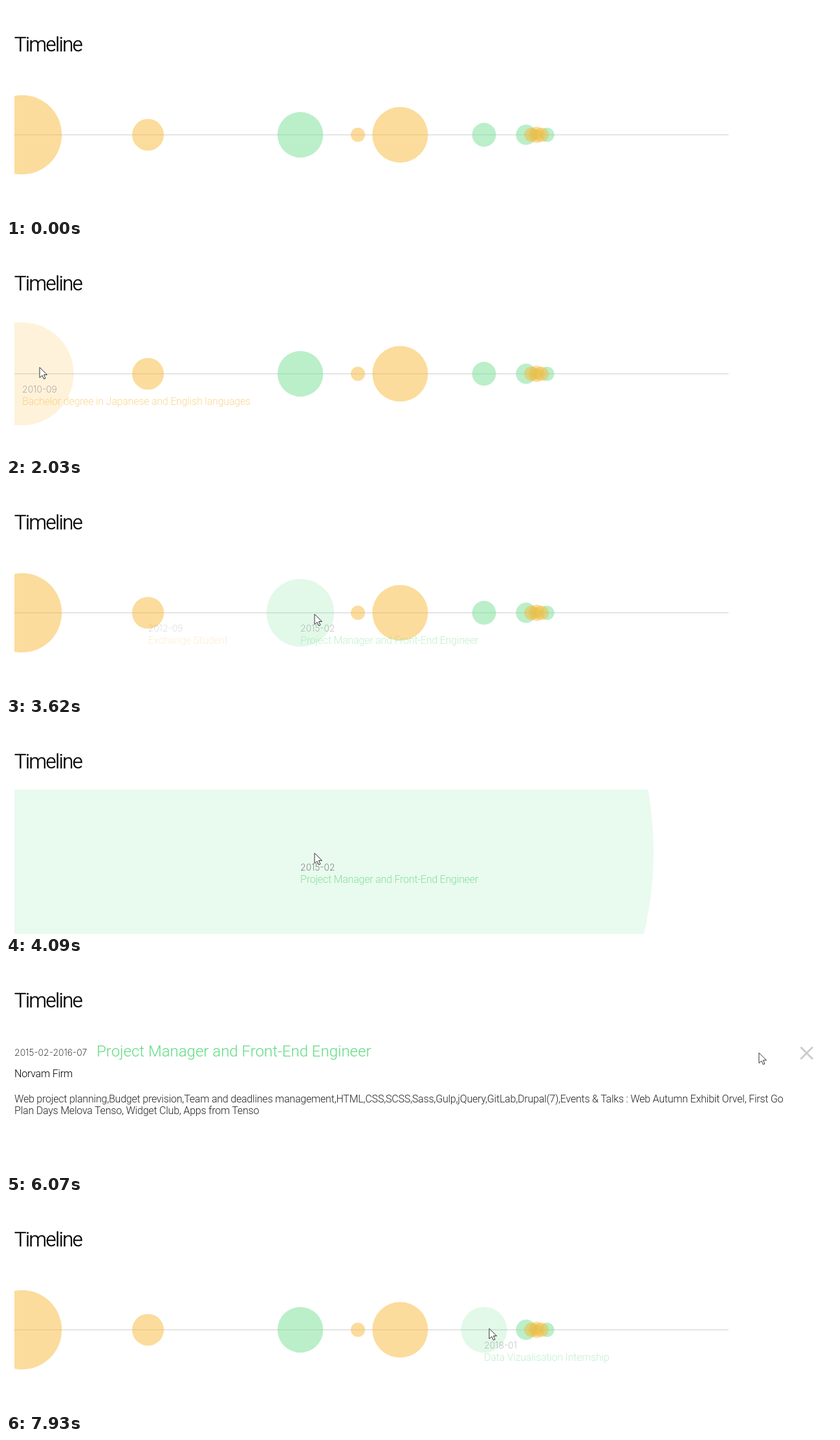
These frames come from a looping animation (1280 px wide and 326 px high, 8000 ms). An HTML page:

```html
<!DOCTYPE html>
<html lang="en">
<head>
<meta charset="utf-8">
<title>Timeline</title>
<style>
  html, body { margin: 0; width: 100%; height: 100%; overflow: hidden; background: #fff; }
  svg { display: block; width: 1280px; height: 326px; }
  text { font: 300 16px Roboto, sans-serif; letter-spacing: -.21px; }
  .heading { font-size: 31px; letter-spacing: -1.45px; stroke: #000; stroke-width: .4px; }
  .date { font: 200 14px Inter, sans-serif; letter-spacing: 0; }
  .role { font-size: 24px; letter-spacing: 0; fill: #5fdc82; }
  .body { fill: #222; }
</style>
</head>
<body>
<svg viewBox="0 0 1280 326">
  <clipPath id="frame"><rect x="13" y="103" width="1255" height="223"/></clipPath>
  <text class="heading" x="13" y="70">Timeline</text>
  <g id="chart" clip-path="url(#frame)">
    <path id="axis" d="M13 199H1117" stroke="#ddd" stroke-width="1.5"/>
    <g id="bubbles"></g>
    <g id="labels"></g>
  </g>
  <g id="detail">
    <text class="date" x="13" y="145">2015-02-2016-07</text>
    <text class="role" x="140" y="146">Project Manager and Front-End Engineer</text>
    <text x="13" y="178">Norvam Firm</text>
    <text class="body" x="13" y="217">Web project planning,Budget prevision,Team and deadlines management,HTML,CSS,SCSS,Sass,Gulp,jQuery,GitLab,Drupal(7),Events &amp; Talks : Web Autumn Exhibit Orvel, First Go</text>
    <text class="body" x="13" y="235">Plan Days Melova Tenso, Widget Club, Apps from Tenso</text>
    <path d="M1228.5 131.5l18.5 18.5m0-18.5l-18.5 18.5" stroke="#ccc" stroke-width="3"/>
  </g>
  <path id="cursor" d="M0 0V16L4 12.5L6.5 18L9 17L6.5 11.5H11.5Z" fill="#fff" stroke="#333"/>
</svg>
<script>
const LOOP = 8000, GROW = 700, FADE = 1400, OPEN = 3816, CLOSE = 6300;
const ORANGE = '#f7b93b', GREEN = '#77df93';
const $ = id => document.getElementById(id);

// x, radius, colour and, where hovered: enter, leave, date, title
const items = [
  [25, 61.2, ORANGE, 1570, 2180, '2010-09', 'Bachelor degree in Japanese and English languages'],
  [219.5, 24.5, ORANGE, 2450, 2990, '2012-09', 'Exchange Student'],
  [455, 35.3, GREEN, 3240, 4500, '2015-02', 'Project Manager and Front-End Engineer'],
  [544, 11, ORANGE],
  [609.3, 43, ORANGE],
  [739, 18.5, GREEN, 7550, 9999, '2018-01', 'Data Vizualisation Internship'],
  [804, 15.7, GREEN],
  [820, 9, GREEN],
  [836.5, 11, GREEN],
  [812, 11, ORANGE],
  [820.3, 12.5, ORANGE],
  [828, 11, ORANGE]
].map(([x, r, fill, enter, leave, date, title]) => {
  const circle = add('circle', $('bubbles'), { cx: x, cy: 199, fill });
  const label = title && add('g', $('labels'));
  if (label) {
    add('text', label, { x, y: 228, class: 'date', fill: '#444' }).textContent = date;
    add('text', label, { x, y: 247, fill }).textContent = title;
  }
  return { r, enter, leave, circle, label };
});
const opened = items[2];

// Cursor stops: time, x, y
const stops = [
  [1130, 744, 276], [1590, 66, 190], [1750, 52, 189], [2080, 52, 189], [2180, 108, 191],
  [2450, 215, 195], [2900, 225, 198], [3250, 477, 201], [5180, 477, 201], [5250, 759, 158],
  [5650, 759, 158], [6150, 1240, 137], [6380, 1240, 137], [6760, 865, 186], [7240, 828, 183],
  [7320, 828, 183], [7390, 726, 198], [7590, 726, 198], [7680, 747, 197], [LOOP, 747, 197]
];

function add(tag, parent, attrs = {}) {
  const el = document.createElementNS('http://www.w3.org/2000/svg', tag);
  for (const key in attrs) el.setAttribute(key, attrs[key]);
  return parent.appendChild(el);
}

const ramp = (t, from, to) => Math.min(1, Math.max(0, (t - from) / (to - from)));

// The CSS "ease" curve, solved by bisection
function ease(t, start, duration) {
  const p = ramp(t, start, start + duration);
  if (p === 0 || p === 1) return p;
  const bezier = (s, a, b) => 3 * s * (1 - s) ** 2 * a + 3 * s * s * (1 - s) * b + s ** 3;
  let low = 0, high = 1;
  for (let i = 0; i < 16; i++) {
    const mid = (low + high) / 2;
    if (bezier(mid, .25, .25) < p) low = mid; else high = mid;
  }
  return bezier(low, .1, 1);
}

function hover(item, t, duration) {
  if (!item.label || (item === opened && t > item.leave)) return 0;
  return ease(t, item.enter, duration) - ease(t, item.leave, duration);
}

function moveCursor(t) {
  const next = stops.findIndex(stop => stop[0] > t);
  $('cursor').style.opacity = next > 0 ? 1 : 0;
  if (next < 1) return;
  const [t0, x0, y0] = stops[next - 1], [t1, x1, y1] = stops[next];
  const p = ramp(t, t0, t1);
  $('cursor').setAttribute('transform', `translate(${x0 + (x1 - x0) * p} ${y0 + (y1 - y0) * p})`);
}

function draw() {
  const t = performance.now() % LOOP;
  const opening = t < opened.leave;
  const others = opening ? 1 - ramp(t, 3780, 3980) : 1;

  for (const item of items) {
    const h = hover(item, t, GROW);
    const spread = item === opened && opening ? 730 * ease(t, OPEN, GROW) : 0;
    const shown = item === opened ? 1 : others;
    item.circle.setAttribute('r', item.r + 20 * h + spread);
    item.circle.style.opacity = (.5 - .34 * h) * shown;
    if (item.label) item.label.style.opacity = hover(item, t, FADE) * shown;
  }
  $('axis').style.opacity = others;
  $('chart').style.opacity = 1 - ramp(t, 4200, 4380) + ramp(t, 6800, 7200);
  $('detail').style.opacity = ramp(t, 4390, 4770) - ease(t, CLOSE, 1000);
  moveCursor(t);
  requestAnimationFrame(draw);
}
draw();
</script>
</body>
</html>
```
